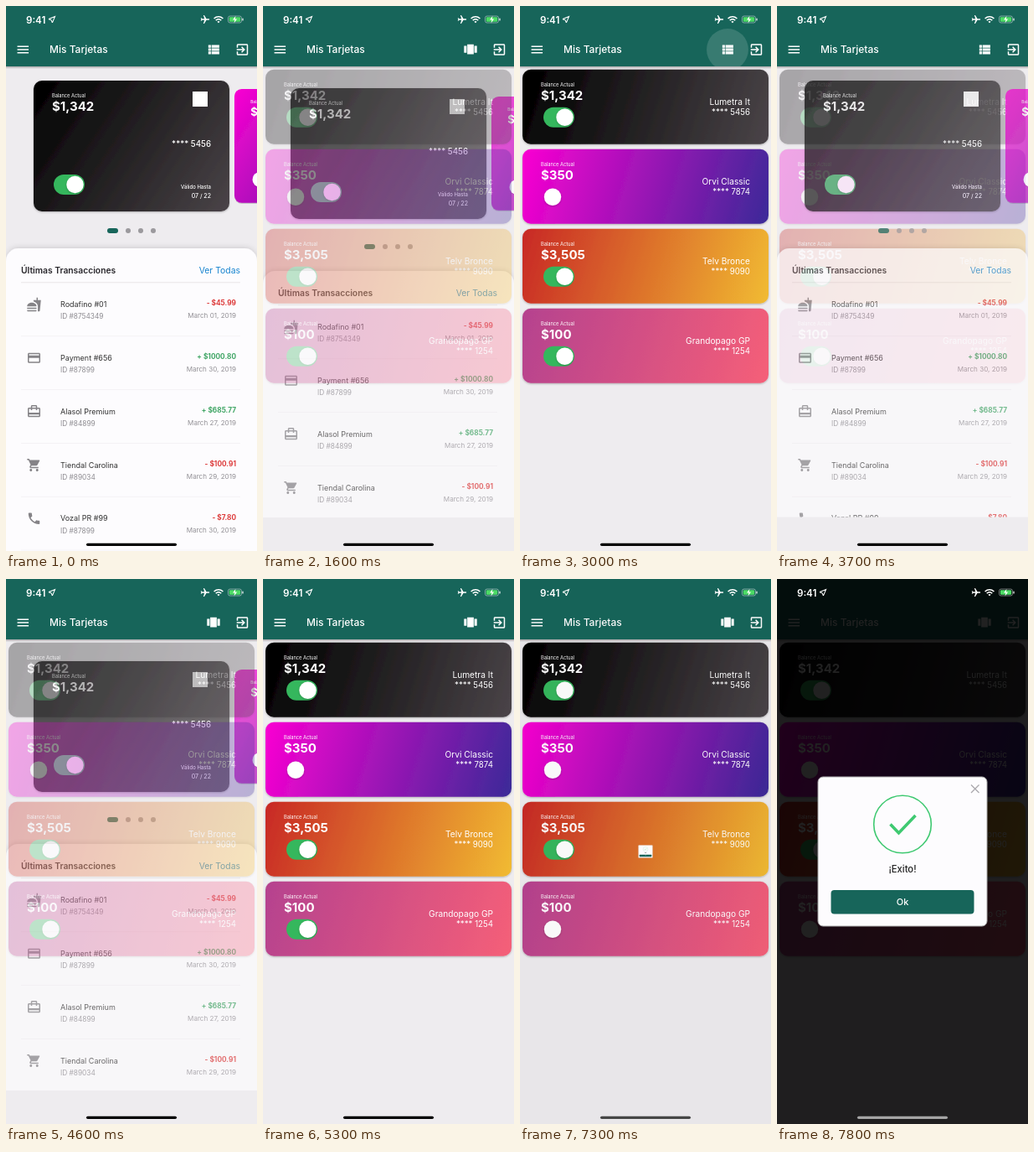
An HTML page that plays this animation: 300 px wide and 650 px high, repeating every 8 s.

```html
<!DOCTYPE html>
<html lang="es">
<head>
<meta charset="utf-8">
<style>
html, body { margin: 0; width: 100%; height: 100%; overflow: hidden; background: #eeecef; }
svg { display: block; width: 300px; height: 650px; font-family: Inter, Roboto, sans-serif; }
</style>
</head>
<body>
<svg id="stage" viewBox="0 0 300 650"></svg>
<script>
const GREEN = '#17655a', LOOP = 8000;

const ICONS = {
  menu: 'M3 18h18v-2H3v2zm0-5h18v-2H3v2zm0-7v2h18V6H3z',
  list: 'M4 14h4v-4H4v4zm0 5h4v-4H4v4zM4 9h4V5H4v4zm5 5h12v-4H9v4zm0 5h12v-4H9v4zM9 5v4h12V5H9z',
  carousel: 'M7 19h10V4H7v15zm-5-2h4V6H2v11zM18 6v11h4V6h-4z',
  exit: 'M10.09 15.59L11.5 17l5-5-5-5-1.41 1.41L12.67 11H3v2h9.67l-2.58 2.59zM19 3H5c-1.11 0-2 .9-2 2v4h2V5h14v14H5v-4H3v4c0 1.1.89 2 2 2h14c1.1 0 2-.9 2-2V5c0-1.1-.9-2-2-2z',
  food: 'M18.06 22.99h1.66c.84 0 1.53-.64 1.63-1.46L23 5.05h-5V1h-1.97v4.05h-4.97l.3 2.34c1.71.47 3.31 1.32 4.27 2.26 1.44 1.42 2.43 2.89 2.43 5.29v8.05zM1 21.99V21h15.03v.99c0 .55-.45 1-1.01 1H2.01c-.56 0-1.01-.45-1.01-1zm15.03-7c0-8-15.03-8-15.03 0h15.03zM1.02 17h15v2h-15z',
  card: 'M20 4H4c-1.11 0-1.99.89-1.99 2L2 18c0 1.11.89 2 2 2h16c1.11 0 2-.89 2-2V6c0-1.11-.89-2-2-2zm0 14H4v-6h16v6zm0-10H4V6h16v2z',
  travel: 'M20 6h-3V4c0-1.11-.89-2-2-2H9c-1.11 0-2 .89-2 2v2H4c-1.11 0-2 .89-2 2v11c0 1.11.89 2 2 2h16c1.11 0 2-.89 2-2V8c0-1.11-.89-2-2-2zM9 4h6v2H9V4zm11 15H4v-2h16v2zm0-5H4V8h3v2h2V8h6v2h2V8h3v6z',
  cart: 'M7 18c-1.1 0-1.99.9-1.99 2S5.9 22 7 22s2-.9 2-2-.9-2-2-2zM1 2v2h2l3.6 7.59-1.35 2.45c-.16.28-.25.61-.25.96 0 1.1.9 2 2 2h12v-2H7.42c-.14 0-.25-.11-.25-.25l.03-.12.9-1.63h7.45c.75 0 1.41-.41 1.75-1.03l3.58-6.49A1 1 0 0 0 20 4H5.21l-.94-2H1zm16 16c-1.1 0-1.99.9-1.99 2s.89 2 1.99 2 2-.9 2-2-.9-2-2-2z',
  phone: 'M6.62 10.79c1.44 2.83 3.76 5.14 6.59 6.59l2.2-2.2c.27-.27.67-.36 1.02-.24 1.12.37 2.33.57 3.57.57.55 0 1 .45 1 1V20c0 .55-.45 1-1 1-9.39 0-17-7.61-17-17 0-.55.45-1 1-1h3.5c.55 0 1 .45 1 1 0 1.25.2 2.45.57 3.57.11.35.03.74-.25 1.02l-2.2 2.2z',
  plane: 'M21 16v-2l-8-5V3.5c0-.83-.67-1.5-1.5-1.5S10 2.67 10 3.5V9l-8 5v2l8-2.5V19l-2 1.5V22l3.5-1 3.5 1v-1.5L13 19v-5.5l8 2.5z',
  wifi: 'M1 9l2 2c4.97-4.97 13.03-4.97 18 0l2-2C16.93 2.93 7.08 2.93 1 9zm8 8l3 3 3-3c-1.65-1.66-4.34-1.66-6 0zm-4-4l2 2c2.76-2.76 7.24-2.76 10 0l2-2C15.14 9.14 8.87 9.14 5 13z',
  arrow: 'M21 3L3 10.53v.98l6.84 2.65L12.48 21h.98L21 3z'
};

// x, vertical middle of the capitals, size, text
const text = (x, y, size, str, fill = '#fff', weight = 400, anchor = 'start') =>
  `<text x="${x}" y="${y + size * .36}" font-size="${size}" fill="${fill}" font-weight="${weight}" text-anchor="${anchor}">${str}</text>`;
const rect = (x, y, w, h, r, fill, more = '') =>
  `<rect x="${x}" y="${y}" width="${w}" height="${h}" rx="${r}" fill="${fill}" ${more}/>`;
const circle = (x, y, r, fill, more = '') => `<circle cx="${x}" cy="${y}" r="${r}" fill="${fill}" ${more}/>`;
const line = (d, color, width) => `<path d="${d}" fill="none" stroke="${color}" stroke-width="${width}"/>`;
const icon = (name, x, y, size, fill = '#fff', more = '') =>
  `<path d="${ICONS[name]}" fill="${fill}" ${more} transform="translate(${x} ${y}) scale(${size / 24}) ${name == 'plane' ? 'rotate(90)' : ''} translate(-12 -12)"/>`;
const group = (id, body, more = '') => `<g id="${id}" ${more}>${body}</g>`;

const toggle = (x, y, on, id = '') =>
  rect(x, y - 12, 37, 24, 12, '#35b75d', `id="${id}track" opacity="${+on}"`) +
  circle(x + (on ? 25.5 : 11), y, 10.2, '#fff', `id="${id}knob" filter="url(#soft)"`);

const CARDS = [
  ['#000', '#4a4448', '$1,342', 'Lumetra It', '5456', true],
  ['#fa00d2', '#3b2a98', '$350', 'Orvi Classic', '7874', false],
  ['#c82826', '#f1bb31', '$3,505', 'Telv Bronce', '9090', true],
  ['#b5428f', '#f55f78', '$100', 'Grandopago GP', '1254', true]
];

// Gradient running straight from the top left to the bottom right corner
const gradient = (id, w, h, [from, to]) =>
  `<linearGradient id="${id}" gradientUnits="userSpaceOnUse" x1="0" y1="0" x2="${w}" y2="${h}">
   <stop stop-color="${from}"/><stop offset="1" stop-color="${to}"/></linearGradient>`;

const wideCard = (c, i) => group('', rect(0, 0, 294, 89, 10, `url(#w${i})`, 'filter="url(#soft)"') +
  text(22, 18, 5.7, 'Balance Actual') + text(22, 31, 15, c[2], '#fff', 700) +
  toggle(25, 57, c[5], 'sw' + i) +
  text(272, 38.5, 10.2, c[3], '#fff', 400, 'end') +
  text(272, 51, 9.7, '**** ' + c[4], '#fff', 400, 'end'), `transform="translate(3 ${75.7 + 95 * i})"`);

const bigCard = (c, i, place) => group('', rect(0, 0, 234, 156, 10, `url(#b${i})`, 'filter="url(#soft)"') +
  text(22, 18, 5.7, 'Balance Actual') + text(22, 31, 15, c[2], '#fff', 700) +
  toggle(24, 124, c[5], 'big' + i) + rect(190, 13, 18, 18, 0, '#fff') +
  text(212, 76, 9.7, '**** ' + c[4], '#fff', 500, 'end') +
  text(212, 127, 6, 'Válido Hasta', '#fff', 500, 'end') +
  text(212, 137.5, 7, '07 / 22', '#fff', 500, 'end'), `transform="${place}"`);

const ROWS = [
  ['food', 'Rodafino #01', '8754349', '- $45.99', '01'],
  ['card', 'Payment #656', '87899', '+ $1000.80', '30'],
  ['travel', 'Alasol Premium', '84899', '+ $685.77', '27'],
  ['cart', 'Tiendal Carolina', '89034', '- $100.91', '29'],
  ['phone', 'Vozal PR #99', '87899', '- $7.80', '30']
];
const row = ([ico, name, id, amount, day], i) => {
  const y = 356 + 63.8 * i;
  return icon(ico, 33.5, y, 18, '#858387') +
    text(65, y, 9, name, '#333') + text(65, y + 14.5, 8.3, 'ID #' + id, '#8d8b90') +
    text(275, y - 1.5, 8.3, amount, amount[0] == '-' ? '#dd3b3b' : '#3fa564', 700, 'end') +
    text(275, y + 13.5, 8.1, `March ${day}, 2019`, '#929095', 400, 'end') +
    rect(18, y + 37.5, 262, .6, 0, '#efedf0');
};

const dots = rect(121, 265, 13, 6, 3, GREEN) + [146, 161, 176].map(x => circle(x, 268, 3, '#9b999d')).join('');
const panel = rect(0, 289, 300, 400, 15, '#fdfcfe', 'filter="url(#up)"') +
  text(18, 315, 10.3, 'Últimas Transacciones', '#28262b', 600) +
  text(280, 315, 10.4, 'Ver Todas', '#1784cf', 400, 'end') +
  rect(18, 329.5, 262, .7, 0, '#dfdde0') + ROWS.map(row).join('');

const frame = (x, y, w, h) => rect(x, y, w, h, 6, '#fdfcfe', 'stroke="#aaa" stroke-width="1"') +
  line(`M${x + w - 19} ${y + 9.5}l9.5 9.5m0 -9.5l-9.5 9.5`, '#aaa8ad', 1.3);
const button = (x, y, w, label, fill) => rect(x, y, w, 28.5, 4, fill) + text(x + w / 2, y + 14.3, 11, label, '#fff', 500, 'middle');
const ring = (y, color) => circle(150, y, 34.3, 'none', `stroke="${color}" stroke-width="1.6"`);

const askDialog = frame(29.5, 221.5, 241, 207.5) + ring(277.5, '#f2a23a') +
  line('M150.5 261.5v23', '#f2a23a', 3) + circle(150.5, 291.5, 2.2, '#f2a23a') +
  text(150, 331, 11.2, 'Apagar?', '#222', 500, 'middle') +
  text(150, 352, 9.7, 'Estás seguro que quieres Apagar tu', '#333', 400, 'middle') +
  text(150, 365, 9.7, 'tarjeta que termina en x1254?', '#333', 400, 'middle') +
  button(45, 386, 103.5, 'Sí', GREEN) + button(151.5, 386, 103.5, 'Cancelar', '#f8433c');
const doneDialog = frame(49, 236, 202, 178) + ring(292.5, '#3fc971') +
  line('M135.5 292.5l10 10.5l20 -21', '#3fc971', 3.6) +
  text(150, 345.5, 11.2, '¡Exito!', '#222', 500, 'middle') + button(64.5, 371, 171, 'Ok', GREEN);

const battery = rect(265.5, 12, 16, 8, 2.2, 'none', 'stroke="#fff" stroke-opacity=".55" stroke-width=".8"') +
  rect(266.8, 13.2, 13.4, 5.6, 1.2, '#4cdb65') + rect(282.4, 14.5, 1.2, 3, .6, '#fff') +
  '<path d="M274.5 11.8l-3.4 4.8h2.4l-1 3.8l3.6-5h-2.4z" fill="#fff"/>';

const stage = document.getElementById('stage');
stage.innerHTML = `<defs>
  <filter id="soft" x="-20%" y="-20%" width="140%" height="150%"><feDropShadow dx="0" dy=".8" stdDeviation=".8" flood-opacity=".3"/></filter>
  <filter id="up" x="-5%" y="-5%" width="110%" height="110%"><feDropShadow dx="0" dy="-1" stdDeviation="3" flood-opacity=".14"/></filter>
  <linearGradient id="shade" x2="0" y2="1"><stop stop-opacity=".3"/><stop offset="1" stop-opacity="0"/></linearGradient>
  ${CARDS.map((c, i) => gradient('w' + i, 294, 89, c) + gradient('b' + i, 234, 156, c)).join('')}
  <clipPath id="clip"><rect id="clipBox" y="72" width="300" height="589"/></clipPath></defs>` +
  rect(0, 0, 300, 72, 0, GREEN) + circle(248, 52, 25, '#fff', 'id="ripple"') +
  icon('menu', 20.3, 52, 18) + text(52, 52, 12, 'Mis Tarjetas', '#fff', 500) +
  group('listIcon', icon('list', 248, 52, 18.5)) + group('carouselIcon', icon('carousel', 248, 52, 18.5)) +
  icon('exit', 282.5, 52, 18) + rect(0, 72, 300, 578, 0, '#eeecef') +
  group('views',
    group('home',
      group('cards', bigCard(CARDS[0], 0, 'translate(33 89)') + bigCard(CARDS[1], 1, 'translate(273 99) scale(.87)')) +
      group('dots', dots) + group('panel', panel)) +
    group('wide', CARDS.map(wideCard).join('')), 'clip-path="url(#clip)"') +
  rect(0, 72, 300, 3, 0, 'url(#shade)') +
  rect(0, 0, 300, 650, 0, '#000', 'id="dim"') +
  group('ask', askDialog) + group('done', doneDialog) +
  text(24, 16.5, 11.6, '9:41', '#fff', 600) +
  icon('arrow', 55, 16, 9.5, 'none', 'stroke="#fff" stroke-width="2.6"') +
  icon('plane', 238, 16.3, 12.5) + icon('wifi', 254, 16, 13) + battery +
  rect(96, 640.7, 108, 3.2, 1.6, '#000', 'id="bar"');

const $ = id => document.getElementById(id);
const set = (id, key, value) => $(id).setAttribute(key, value);
const clamp = v => Math.max(0, Math.min(1, v));
const ramp = (t, start, length) => clamp((t - start) / length);
const show = (id, on) => set(id, 'display', on ? 'inline' : 'none');

// CSS "ease" curve, solved by bisection
function ease(x) {
  const bez = (a, b, s) => 3 * a * s * (1 - s) ** 2 + 3 * b * s * s * (1 - s) + s ** 3;
  let lo = 0, hi = 1;
  for (let i = 0; i < 20; i++) {
    const mid = (lo + hi) / 2;
    if (bez(.25, .25, mid) < x) lo = mid; else hi = mid;
  }
  return bez(.1, 1, lo);
}

function keyed(t, keys) {
  const i = keys.findIndex(k => k[0] > t);
  if (i < 0) return keys.at(-1)[1];
  if (!i) return keys[0][1];
  const [t0, a] = keys[i - 1], [t1, b] = keys[i];
  return a + (b - a) * (t - t0) / (t1 - t0);
}

function popup(id, v) {
  const s = Math.min(1, v * 2);
  show(id, s > 0);
  set(id, 'transform', `translate(150 325) scale(${s}) translate(-150 -325)`);
}

function draw(t) {
  const toWide = t > 1300 && t <= 3000 || t > 4300;
  const fade = t > 4300 ? ramp(t, 4300, 1000) : ramp(t, 1300, 1000) - ramp(t, 3000, 1000);

  // The incoming view lies on top
  $('views').append($(toWide ? 'wide' : 'home'));
  set('home', 'opacity', 1 - fade);
  set('wide', 'opacity', fade);
  show('home', fade < 1);
  show('wide', fade > 0);
  set('clipBox', 'height', 589 - 172 * fade);
  [['cards', 9], ['dots', 19], ['panel', 27]].forEach(([id, dy]) =>
    set(id, 'transform', `translate(0 ${toWide ? dy : 0})`));

  show('listIcon', !toWide);
  show('carouselIcon', toWide);
  const tap = [1300, 3000, 4300].find(s => t >= s && t < s + 250);
  set('ripple', 'opacity', tap ? .14 * (1 - (t - tap) / 250) : 0);

  const off = ramp(t, 7000, 200);
  set('sw3track', 'opacity', 1 - off);
  set('sw3knob', 'cx', 50.5 - 14.5 * off);

  const ask = ramp(t, 5700, 500) - ramp(t, 6500, 500), done = ramp(t, 7280, 500);
  popup('ask', ask);
  popup('done', done);
  set('dim', 'opacity', .87 * ease(Math.max(ask, done)));

  const grey = keyed(t, [[5800, 0], [6200, 165], [6800, 165], [7300, 70], [7600, 165]]);
  set('bar', 'fill', `rgb(${grey},${grey},${grey})`);
}

function tick() {
  draw(performance.now() % LOOP);
  requestAnimationFrame(tick);
}
tick();
</script>
</body>
</html>
```
